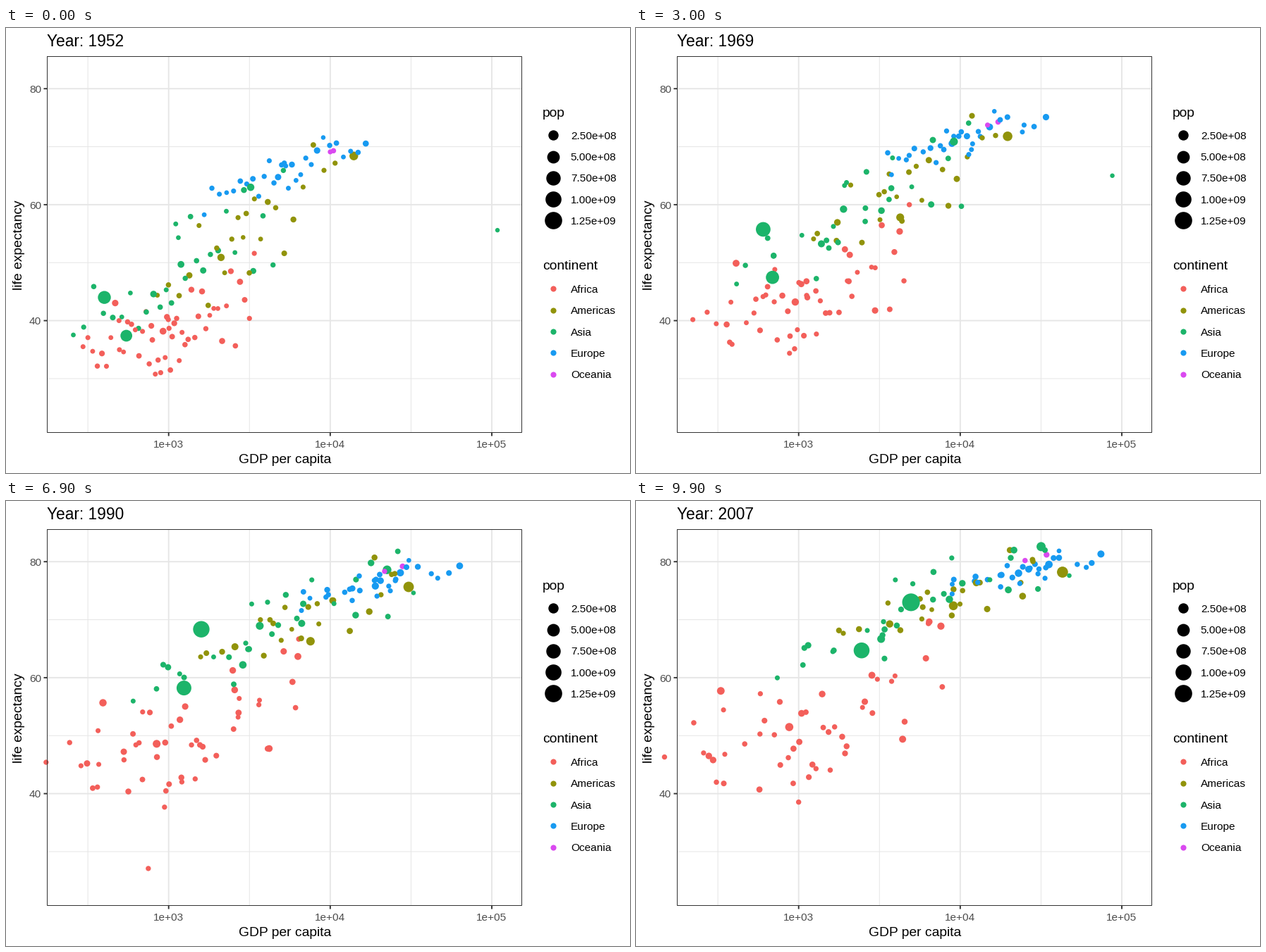
These frames come from a looping animation (885 by 632 pixels, 10000 ms). A matplotlib script:

```python
import numpy as np
import matplotlib.pyplot as plt
from matplotlib.animation import FuncAnimation

W, H, DPI = 885, 632, 100
FRAMES, STEP = 100, 9                 # nine frames per five-year step
SPAN = np.linspace(0, 1, 12)          # 1952 to 2007
GROWTH = 2.4                          # population gain over the loop
LEFT, RIGHT, TOP, BOTTOM = 58.5, 731.5, 40.5, 574.5

plt.rcParams["font.family"] = "Liberation Sans"

COLORS = {"Africa": "#F35F5A", "Americas": "#91930A", "Asia": "#1CB46A",
          "Europe": "#179AF1", "Oceania": "#DA49F0"}

# Crowds: count, then first and last year as
# (log income, half width, life, rise along the band, scatter).
CROWDS = {
    "Africa": (50, (3.0, .53, 39.5, 4, 4.5), (3.12, .8, 54, 8, 6.5)),
    "Americas": (23, (3.48, .55, 55, 11, 4.5), (3.9, .65, 73.5, 6, 2.4)),
    "Asia": (29, (3.06, .65, 47, 9, 5.5), (3.7, .85, 71, 10, 3.3)),
    "Europe": (30, (3.72, .5, 65.5, 6, 1.8), (4.4, .45, 78, 3, 1)),
    "Oceania": (2, (4.01, .01, 69.2, .1, 0), (4.47, .07, 80.7, .5, 0)),
}

# Dots that stand apart: continent, population in millions, and
# (income, life) at even spacing in time.
LEADERS = [
    ("Asia", 550, (400, 44), (515, 47.6), (700, 63.4), (1200, 66.6),
     (2150, 70.2), (4959, 73)),
    ("Asia", 410, (547, 37.4), (800, 54), (2452, 64.7)),
    ("Asia", .2, (108382, 55.6), (88000, 66), (30000, 74.5), (47307, 77.6)),
    ("Asia", 70, (3217, 63), (18000, 76), (31656, 82.6)),
    ("Americas", 140, (13990, 68.4), (24500, 74), (42952, 78.2)),
    ("Americas", 65, (2109, 50.9), (6700, 62.3), (9066, 72.4)),
    ("Africa", 15, (781, 39.1), (800, 47.7), (278, 46.5)),
    ("Africa", 2.5, (493, 40), (590, 44), (780, 46), (740, 22), (863, 46.2)),
]


def px(log_gdp):
    return 230.7 + 229.15 * (log_gdp - 3)


def py(life):
    return 86.2 + 8.235 * (80 - life)


def radius(millions):
    return 3.1 + 9.2 * np.sqrt(millions / 1250)


def area(r):
    return (2 * r * 72 / DPI) ** 2


def leader(path):
    gdp, life = np.array(path, float).T
    knots = np.linspace(0, 1, len(path))
    return np.interp(SPAN, knots, np.log10(gdp)), np.interp(SPAN, knots, life)


def wander(rng, n):
    walk = rng.normal(0, 1, (len(SPAN), n)).cumsum(axis=0)
    return (walk - walk[0]) / np.sqrt(len(SPAN))


def crowd(rng, n, first, last):
    ease = 1 - (1 - SPAN[:, None]) ** 1.5
    mid, half, life, rise, noise = (a + (b - a) * ease
                                    for a, b in zip(first, last))
    s = np.linspace(-1, 1, n)
    u = np.sign(s) * np.abs(s) ** 1.4
    z = np.clip(rng.normal(0, 1, n), -1.8, 1.8)
    x = mid + half * (u + 0.1 * wander(rng, n))
    y = life + rise * u + noise * (z + 0.3 * wander(rng, n))
    return x, np.minimum(y, 82)


def build():
    rng = np.random.default_rng(7)
    xs, ys, pops, colors = [], [], [], []
    for name, (n, first, last) in CROWDS.items():
        x, y = crowd(rng, n, first, last)
        xs.extend(x.T)
        ys.extend(y.T)
        pops.extend(np.clip(rng.lognormal(1.5, 1, n), 0.3, 45))
        colors += [COLORS[name]] * n
    for name, pop, *path in LEADERS:
        x, y = leader(path)
        xs.append(x)
        ys.append(y)
        pops.append(pop)
        colors.append(COLORS[name])
    order = rng.permutation(len(pops))
    pop = np.outer(1 + (GROWTH - 1) * SPAN, pops)
    keys = np.stack([px(np.array(xs).T), py(np.array(ys).T), pop])
    return keys[:, :, order], [colors[i] for i in order]


fig = plt.figure(figsize=(W / DPI, H / DPI), dpi=DPI, facecolor="white")
ax = fig.add_axes((0, 0, 1, 1))
ax.set(xlim=(0, W), ylim=(H, 0))
ax.axis("off")


def label(x, y, s, size, color="black", **kw):
    return ax.text(x, y, s, fontsize=size * 72 / DPI, color=color,
                   va="baseline", **kw)


def line(xs, ys, width, color, z=1):
    ax.plot(xs, ys, color=color, lw=width * 72 / DPI, zorder=z, snap=False,
            solid_capstyle="butt", solid_joinstyle="miter")


def draw_panel():
    grid, dark, grey = "#E6E6E6", "#333333", "#4D4D4D"
    for v in (2.5, 3.5, 4.5):
        line([px(v)] * 2, [TOP, BOTTOM], 1, grid)
    for v in (30, 50, 70):
        line([LEFT, RIGHT], [py(v)] * 2, 1, grid)
    for v in (3, 4, 5):
        line([px(v)] * 2, [TOP, BOTTOM], 1.9, grid)
        line([px(v)] * 2, [BOTTOM, BOTTOM + 5], 1.9, dark)
        label(px(v), 595.8, f"1e+0{v}", 15.4, grey, ha="center")
    for v in (40, 60, 80):
        line([LEFT, RIGHT], [py(v)] * 2, 1.9, grid)
        line([LEFT - 5, LEFT], [py(v)] * 2, 1.9, dark)
        label(50, py(v) + 5.7, str(v), 15.4, grey, ha="right")
    line([LEFT, RIGHT, RIGHT, LEFT, LEFT],
         [TOP, TOP, BOTTOM, BOTTOM, TOP], 1, dark, z=4)
    label(395.3, 618, "GDP per capita", 19.25, ha="center")
    label(23.5, 308, "life expectancy", 19.25, ha="center", rotation=90,
          rotation_mode="anchor")


def draw_legend(title, y, first, rows):
    label(761, y, title, 19.25)
    for i, (text, r, color) in enumerate(rows):
        cy = first + 30.3 * i
        ax.scatter(776, cy, s=area(r), c=color, linewidths=0)
        label(800.8, cy + 5.7, text, 15.4)


draw_panel()
draw_legend("pop", 125.5, 152.2,
            [(f"{m * 1e6:.2e}", radius(m), "black")
             for m in range(250, 1251, 250)])
draw_legend("continent", 343, 370.3,
            [(name, 4.1, color) for name, color in COLORS.items()])

keys, dot_colors = build()
dots = ax.scatter(keys[0, 0], keys[1, 0], s=area(radius(keys[2, 0])),
                  c=dot_colors, linewidths=0, zorder=3)
title = label(58, 26.3, "Year: 1952", 22.8)


def update(frame):
    k = min(frame // STEP, len(SPAN) - 2)
    t = frame / STEP - k
    x, y, pop = keys[:, k] * (1 - t) + keys[:, k + 1] * t
    dots.set_offsets(np.column_stack([x, y]))
    dots.set_sizes(area(radius(pop)))
    title.set_text(f"Year: {round(1952 + frame * 5 / STEP)}")
    return dots, title


anim = FuncAnimation(fig, update, frames=FRAMES, interval=100, repeat=True)
plt.show()
```
